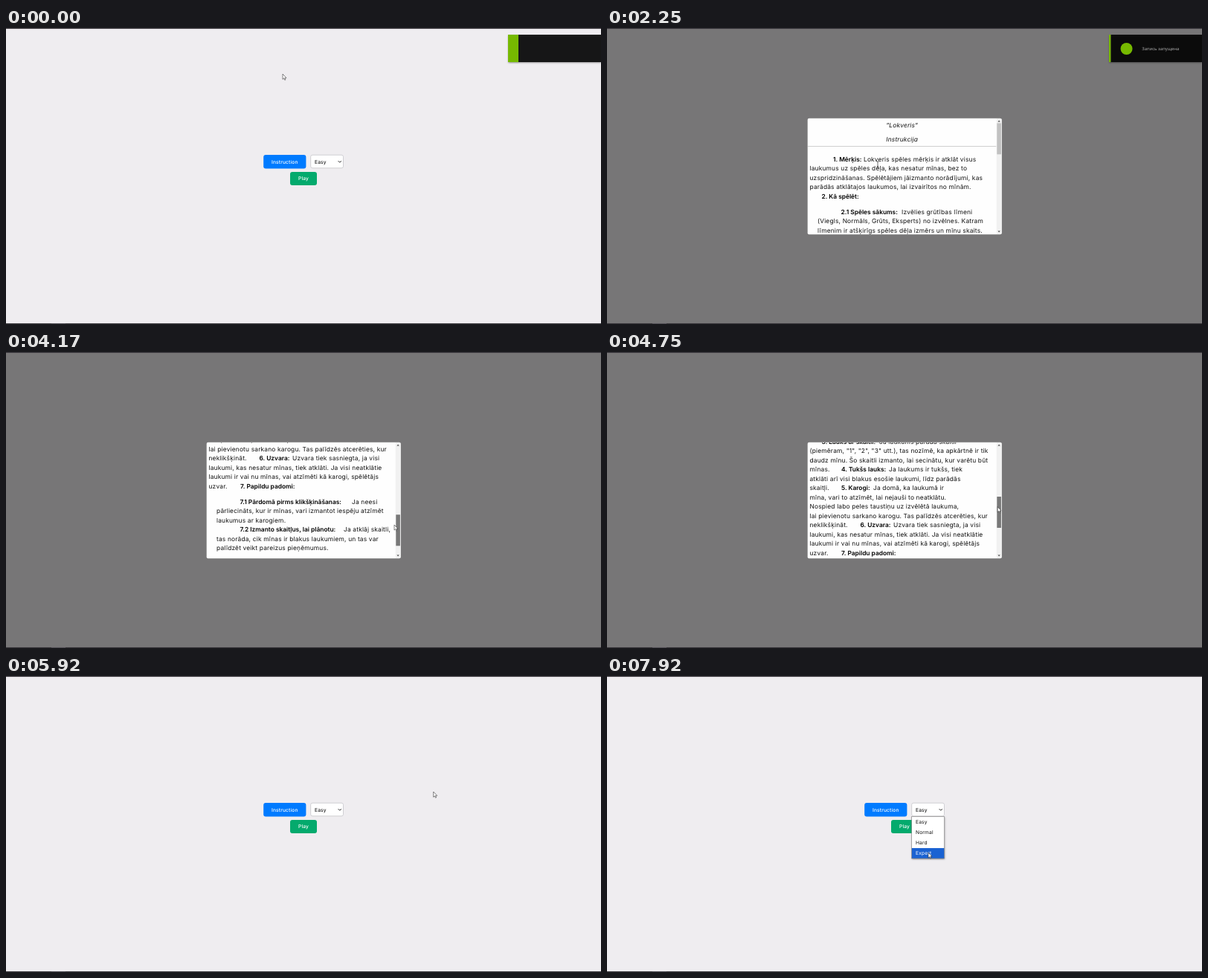
Animation of 800 by 399 pixels, one loop 8 s. Source, as an HTML page:

```html
<!DOCTYPE html>
<html lang="lv">
<head>
<meta charset="utf-8">
<title>Instrukcija</title>
<style>
  html, body { margin: 0; width: 100%; height: 100%; overflow: hidden; background: #efedf0; }
  svg { display: block; width: 100vw; height: 100vh; }
  text { font-family: Inter, "Open Sans", sans-serif; text-rendering: geometricPrecision; white-space: pre; }
  .ui { font-size: 6.67px; letter-spacing: .15px; }
  .button { fill: #fff; text-anchor: middle; font-weight: 500; }
  .doc { font-size: 8.4px; letter-spacing: .17px; fill: #111; }
  .bold { font-weight: 600; letter-spacing: 0; fill: #000; }
  .title { font-style: italic; text-anchor: middle; }
  .toast { font: 5.8px "Noto Sans", sans-serif; fill: #a9a9a9; }
</style>
</head>
<body>
<svg viewBox="0 0 800 399" preserveAspectRatio="none">
  <defs>
    <clipPath id="view"><rect x="270" y="122" width="253.5" height="156"/></clipPath>
    <filter id="shadow" x="-20%" y="-20%" width="140%" height="150%">
      <feDropShadow dx="0.5" dy="1" stdDeviation="1.3" flood-opacity=".4"/>
    </filter>
  </defs>

  <rect width="800" height="399" fill="#efedf0"/>
  <rect x="346.2" y="171" width="57.2" height="18.4" rx="3" fill="#007bff"/>
  <text class="ui button" x="374.8" y="182.5">Instruction</text>
  <rect x="382" y="194" width="36" height="18" rx="3" fill="#04aa6d"/>
  <text class="ui button" x="400" y="205.2">Play</text>
  <rect x="409.7" y="171.2" width="43.8" height="17.6" rx="2.4" fill="#fff" stroke="#bfbfc3" stroke-width=".7"/>
  <text class="ui" x="415" y="182.5">Easy</text>
  <path d="M446.7 179.2l2 2 2-2" fill="none" stroke="#222" stroke-width="1"/>

  <g id="menu">
    <rect x="409.7" y="189.3" width="43.8" height="56.7" fill="#fff" filter="url(#shadow)"/>
    <rect id="highlight" x="409.7" width="43.8" height="14" fill="#1a62d2"/>
    <g id="options"></g>
    <rect x="409.7" y="189.3" width="43.8" height="56.7" fill="none" stroke="#767676" stroke-width=".6"/>
  </g>

  <g id="modal">
    <rect width="800" height="399" fill="#000" opacity=".5"/>
    <rect x="269.7" y="121.7" width="261" height="156.5" rx="2" fill="#fefefe"/>
    <g clip-path="url(#view)">
      <g id="content">
        <text class="doc title" x="396.7" y="134">"Lokveris"</text>
        <text class="doc title" x="396.7" y="153">Instrukcija</text>
        <rect x="270" y="159" width="254" height=".8" fill="#c4c4c4"/>
      </g>
    </g>
    <path d="M523.7 122h5q2 0 2 2v152q0 2-2 2h-5z" fill="#f1f1f1"/>
    <path d="M525.4 126.4l1.7-2 1.7 2zM525.4 273.4l1.7 2 1.7-2z" fill="#505050"/>
    <rect id="thumb" x="524.3" width="5.6" height="42"/>
  </g>

  <rect width="800" height="1.1" fill="#302e33"/>
  <rect y="398.1" width="800" height="1" fill="#302e33"/>
  <rect x="61" y="398.1" width="19" height="1" fill="#55535a"/>

  <g id="toast" filter="url(#shadow)">
    <rect id="accent" y="9" height="37" fill="#76b900"/>
    <rect id="panel" y="9" height="37" fill="#000" opacity=".86"/>
  </g>
  <g id="message">
    <circle cx="698.5" cy="28" r="8" fill="#76b900"/>
    <text class="toast" x="719.3" y="30">Запись запущена</text>
  </g>

  <g id="cursor">
    <path id="arrow" d="M0 0V7.2L1.7 5.7L2.8 8.2L3.9 7.7L2.8 5.3H5z" fill="#fff" stroke="#222" stroke-width=".55"/>
    <path id="beam" d="M-1.5 -4H1.5M0 -4V4M-1.5 4H1.5" fill="none" stroke="#333" stroke-width=".7"/>
  </g>
</svg>

<script>
const LOOP = 8000, STEP = 1000 / 12, LINE = 12.5;
const OPEN = 1830, CLOSE = 5910, DRAG = 3250, RELEASE = 5490, MENU = 6740;
const SCROLL_RATIO = 3.715;
const $ = id => document.getElementById(id);

function addText(parent, x, y, content, className) {
  const node = document.createElementNS("http://www.w3.org/2000/svg", "text");
  node.setAttribute("x", x);
  node.setAttribute("y", y);
  node.setAttribute("class", className);
  node.textContent = content;
  parent.append(node);
}

// Each run starts with its left edge; an asterisk marks bold, a bar separates runs.
const blocks = [`
304*1. Mērķis:|345 Lokveris spēles mērķis ir atklāt visus
272.5 laukumus uz spēles dēļa, kas nesatur mīnas, bez to
272.5 uzspridzināšanas. Spēlētājiem jāizmanto norādījumi, kas
272.5 parādās atklātajos laukumos, lai izvairītos no mīnām.
288.5*2. Kā spēlēt:`, `
314.5*2.1 Spēles sākums:|396 Izvēlies grūtības līmeni
283 (Viegls, Normāls, Grūts, Eksperts) no izvēlnes. Katram
283 līmenim ir atšķirīgs spēles dēļa izmērs un mīnu skaits.
283 Pēc tam nospied “Spēlēt”, lai uzsāktu spēli.
314.5*2.2 Laukuma atklāšana:|419 Spēles laikā noklikšķini
283 uz laukuma, lai to atklātu. Ja laukums ir tukšs (neveido
283 mīnu), tas parādīs skaitli, kas norāda mīnu skaitu blakus
283 laukumos. Ja laukums satur mīnu, spēle beigsies, un tu
283 zaudēsi.`, `
288.5*3. Lauks ar skaitli:|366 Ja laukums parāda skaitli
272.5 (piemēram, "1", "2", "3" utt.), tas nozīmē, ka apkārtnē ir tik
272.5 daudz mīnu. Šo skaitli izmanto, lai secinātu, kur varētu būt
272.5 mīnas.|315*4. Tukšs lauks:|379 Ja laukums ir tukšs, tiek
272.5 atklāti arī visi blakus esošie laukumi, līdz parādās
272.5 skaitļi.|315*5. Karogi:|358 Ja domā, ka laukumā ir
272.5 mīna, vari to atzīmēt, lai nejauši to neatklātu.
272.5 Nospied labo peles taustiņu uz izvēlētā laukuma,
272.5 lai pievienotu sarkano karogu. Tas palīdzēs atcerēties, kur
272.5 neklikšķināt.|340.5*6. Uzvara:|385 Uzvara tiek sasniegta, ja visi
272.5 laukumi, kas nesatur mīnas, tiek atklāti. Ja visi neatklātie
272.5 laukumi ir vai nu mīnas, vai atzīmēti kā karogi, spēlētājs
272.5 uzvar.|315*7. Papildu padomi:`, `
314.5*7.1 Pārdomā pirms klikšķināšanas:|465 Ja neesi
283 pārliecināts, kur ir mīnas, vari izmantot iespēju atzīmēt
283 laukumus ar karogiem.
314.5*7.2 Izmanto skaitļus, lai plānotu:|454 Ja atklāj skaitli,
283 tas norāda, cik mīnas ir blakus laukumiem, un tas var
283 palīdzēt veikt pareizus pieņēmumus.`];

let baseline = 179.6;
for (const block of blocks) {
  for (const line of block.trim().split("\n")) {
    for (const run of line.split("|")) {
      const [, x, mark, content] = run.match(/^([\d.]+)([* ])(.*)$/) || [, 315, " ", run];
      const left = /^\d/.test(run) ? x : 272.5;
      addText($("content"), left, baseline, content, mark === "*" ? "doc bold" : "doc");
    }
    baseline += LINE;
  }
  baseline += 8.5;
}

["Easy", "Normal", "Hard", "Expert"].forEach((name, i) =>
  addText($("options"), 415, 199 + i * 14.15, name, "ui"));

const scrollKeys = [[3250, 0], [3583, 116], [3833, 245], [4000, 312], [4167, 338], [4333, 346],
  [4500, 330], [4670, 300], [4900, 150], [5083, 69], [5250, 98], [5417, 103], [5500, 104]];
const pointerKeys = [[0, 372, 62], [170, 373, 75], [500, 376, 150], [750, 374, 174], [920, 368, 174],
  [1170, 314, 168], [1330, 316, 170], [1580, 362, 175], [1750, 363, 180], [2250, 364, 184],
  [2420, 364, 184], [2670, 300, 245], [2830, 284, 268], [3083, 526, 143], [3250, 526, 142],
  [3583, 525, 173], [4167, 522, 233], [5083, 527, 160], [5500, 528, 170], [5667, 574.7, 156],
  [5920, 574.7, 156], [6250, 500, 168], [6670, 412, 179.5], [7000, 410, 180], [7250, 404, 196],
  [7420, 422, 207], [7667, 429, 222], [7750, 430, 231], [7917, 432, 238]];

function sample(keys, t, column = 1) {
  const next = keys.findIndex(key => key[0] > t);
  if (next === 0) return keys[0][column];
  if (next < 0) return keys[keys.length - 1][column];
  const a = keys[next - 1], b = keys[next];
  const p = (t - a[0]) / (b[0] - a[0]);
  return a[column] + (b[column] - a[column]) * p;
}

const progress = (t, from, to) => Math.min(1, Math.max(0, (t - from) / (to - from)));
const show = (id, on) => $(id).setAttribute("visibility", on ? "inherit" : "hidden");

function placeBar(id, left, right) {
  $(id).setAttribute("x", left);
  $(id).setAttribute("width", Math.max(0, right - left));
}

function drawToast(t) {
  const enter = 1 - (1 - progress(t, 0, 250)) ** 2;
  const panelLeft = 689 - 11.5 * enter + 122.5 * progress(t, 3600, 3850) ** 2;
  const accentLeft = 675 + 125 * progress(t, 3750, 4000) ** 2;
  const panelStart = Math.min(800, Math.max(panelLeft, accentLeft));
  placeBar("accent", accentLeft, panelStart);
  placeBar("panel", panelStart, 800);
  show("toast", t < 3990);
  $("message").setAttribute("opacity", progress(t, 170, 500) * (1 - progress(t, 3200, 3500)));
}

function drawModal(t, open, scroll) {
  show("modal", open);
  $("content").setAttribute("transform", `translate(0 ${-scroll})`);
  $("thumb").setAttribute("y", 128.3 + scroll / SCROLL_RATIO);
  $("thumb").setAttribute("fill", t >= DRAG && t < RELEASE ? "#787878" : "#c1c1c1");
}

function drawMenu(t) {
  show("menu", t >= MENU);
  const active = [7330, 7580, 7820].filter(start => t >= start).length;
  $("highlight").setAttribute("y", 189.5 + active * 14.15);
  [...$("options").children].forEach((option, i) =>
    option.setAttribute("fill", i === active ? "#fff" : "#111"));
}

function drawCursor(t, open, scroll) {
  const dragging = t >= DRAG && t < RELEASE;
  const x = sample(pointerKeys, t);
  const y = dragging ? 142 + scroll / SCROLL_RATIO : sample(pointerKeys, t, 2);
  const overText = open && !dragging && x > 270 && x < 523 && y > 122 && y < 278;
  $("cursor").setAttribute("transform", `translate(${x} ${y})`);
  show("beam", overText);
  show("arrow", !overText);
}

function draw(now) {
  const t = Math.floor((now % LOOP + 4) / STEP) * STEP % LOOP;
  const open = t >= OPEN && t < CLOSE;
  const scroll = sample(scrollKeys, t);
  drawToast(t);
  drawModal(t, open, scroll);
  drawMenu(t);
  drawCursor(t, open, scroll);
}

let start;
function tick(now) {
  start ??= now;
  draw(now - start);
  requestAnimationFrame(tick);
}
draw(0);
requestAnimationFrame(tick);
</script>
</body>
</html>
```
